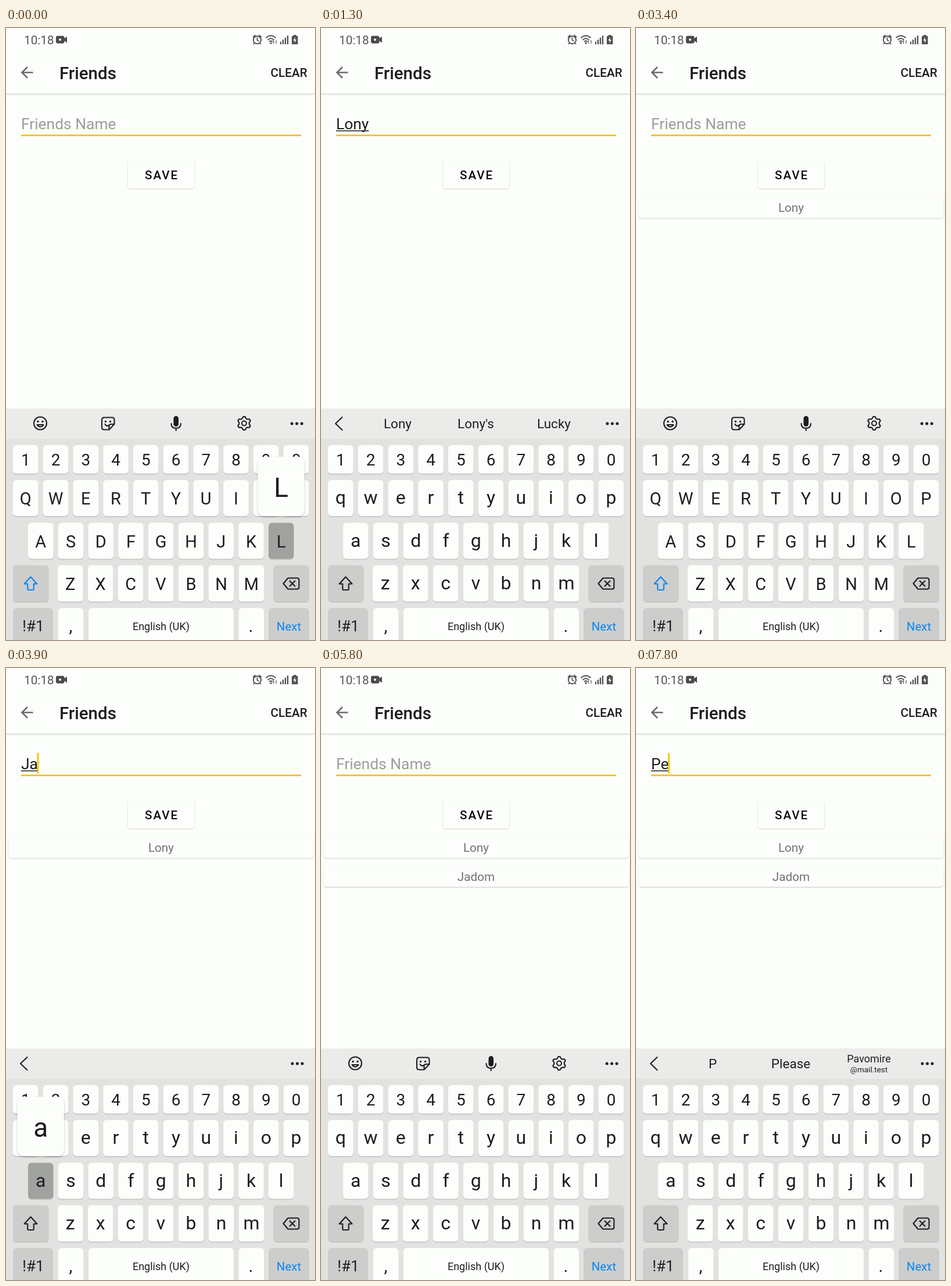
An HTML page for the animation above (8000 ms loop, 532 px wide and 1052 px high).

```html
<!DOCTYPE html>
<html lang="en">
<head>
<meta charset="utf-8">
<title>Friends</title>
<style>
  html, body { margin: 0; width: 100%; height: 100%; overflow: hidden; background: #fcfefb; }
  svg { display: block; width: 100%; height: 100%; }
  text { font-family: Roboto, sans-serif; fill: #1c1d1c; white-space: pre; }
  .mid { text-anchor: middle; }
  .bold { font-weight: 500; }
  .line { fill: none; stroke: #1c1d1c; stroke-width: 2.1; stroke-linecap: round; stroke-linejoin: round; }
  .status { fill: none; stroke: #505250; stroke-width: 1.8; }
</style>
</head>
<body>
<svg id="stage" viewBox="0 0 532 1052">
  <defs>
    <linearGradient id="fade" gradientUnits="userSpaceOnUse" x1="440" x2="472" y1="0" y2="0">
      <stop stop-color="#1c1d1c"/><stop offset="1" stop-color="#1c1d1c" stop-opacity="0"/>
    </linearGradient>
    <linearGradient id="edge" x2="0" y2="1">
      <stop stop-color="#d9dbd8"/><stop offset="1" stop-color="#fcfefb"/>
    </linearGradient>
    <filter id="lift" x="-20%" y="-20%" width="140%" height="140%">
      <feDropShadow dx="0" dy="1.5" stdDeviation="1.8" flood-opacity=".28"/>
    </filter>
    <filter id="soft" x="-5%" y="-20%" width="110%" height="150%">
      <feDropShadow dx="0" dy="1" stdDeviation="1" flood-opacity=".22"/>
    </filter>
  </defs>
  <rect width="532" height="1052" fill="#fcfefb"/>

  <g id="statusBar">
    <text x="31" y="27.7" font-size="20.7" style="fill:#555755">10:18</text>
    <rect x="86" y="13.5" width="14.5" height="13" rx="3" fill="#4a4c4a"/>
    <path d="M99 19L105 14.5V25.5L99 21Z" fill="#4a4c4a"/>
    <circle cx="93" cy="20" r="2" fill="#fcfefb"/>
    <g class="status">
      <circle cx="432.5" cy="20.5" r="6.6" stroke-width="2"/>
      <path d="M432.5 16.5V21L435.5 22.5M425 16L429.5 12M440 16L435.5 12M428 25.5L426 28M437 25.5L439 28"/>
      <path d="M447.5 17Q456 9.500 464.500 17M450.500 20.500Q456 15.500 461.500 20.500M453 23.500Q456 21 459 23.500"/>
      <path d="M460.500 21V27M465 27V21" stroke-width="1.2"/>
      <path d="M473 28V23.500M477 28V20M481 28V16.500M485 28V13" stroke-width="2.300"/>
    </g>
    <circle cx="456" cy="26" r="1.700" fill="#505250"/>
    <path d="M494.500 12H500V14H502.500V28H492V14H494.500Z" fill="#505250"/>
    <path d="M498 15.500L494.500 21.500H497L496.500 26L500 20H497.500Z" fill="#fcfefb"/>
  </g>

  <path d="M46.500 76.500H28M37 67L27.500 76.500L37 86" class="line" style="stroke:#6a6c6a;stroke-width:2.600;stroke-linecap:butt;stroke-linejoin:miter"/>
  <text x="92" y="87.500" font-size="29.500" class="bold">Friends</text>
  <text x="455.500" y="84" font-size="20.700" class="bold">CLEAR</text>
  <rect y="112.500" width="532" height="4" fill="url(#edge)"/>

  <text id="entry" x="26" y="173.500" font-size="26.400"></text>
  <rect id="under" x="26" y="176" height="1.500" fill="#1c1d1c"/>
  <rect x="26" y="183.200" width="482" height="2.800" fill="#f7c40e"/>
  <rect id="caret" y="146" width="3" height="35.500" fill="#f7c40e"/>

  <rect id="save" x="210" y="228" width="114" height="47.500" rx="4" filter="url(#soft)"/>
  <text x="268" y="259.500" font-size="20.700" class="mid bold" letter-spacing="1.800" style="fill:#0c0d0c">SAVE</text>
  <g id="cards"></g>

  <rect y="654" width="532" height="52" fill="#ebecea"/>
  <g id="tools" class="line">
    <circle cx="59" cy="679.500" r="11"/>
    <path d="M53.500 682Q59 689 64.500 682Z"/>
    <path d="M169 669.500H182.500Q186.500 669.500 186.500 673.500V681L177.500 690.500H169Q165 690.500 165 686.500V673.500Q165 669.500 169 669.500ZM186 681H181Q177.500 681 177.500 685V690M170.500 681Q173 685.500 177 683"/>
    <path d="M284.500 680Q284.500 688 292.700 688T301 680M292.700 688V692"/>
    <rect x="289.500" y="668" width="6.500" height="16" rx="3.200" fill="#1c1d1c"/>
    <path id="gear"/>
    <circle cx="410" cy="679.500" r="4"/>
    <g fill="#1c1d1c" stroke="none">
      <circle cx="55" cy="676.500" r="1.800"/><circle cx="63" cy="676.500" r="1.800"/>
      <circle cx="171.500" cy="676.500" r="1.700"/><circle cx="179.500" cy="676.500" r="1.700"/>
    </g>
  </g>
  <path id="back" d="M36.500 669L25 680L36.500 691" class="line"/>
  <g id="dots" fill="#1c1d1c"><circle cx="492.500" cy="680" r="2.500"/><circle cx="501" cy="680" r="2.500"/><circle cx="509.500" cy="680" r="2.500"/></g>
  <g id="hints"></g>

  <rect y="706" width="532" height="346" fill="#e2e3e1"/>
  <g id="keys"></g>
  <path id="arrow" class="line" d="M42.500 943.500L53.500 955.500H47.800V964Q47.800 966 45.800 966H39.200Q37.200 966 37.200 964V955.500H31.500Z"/>
  <path class="line" d="M485.500 945.500H501Q504.500 945.500 504.500 949V961Q504.500 964.500 501 964.500H485.500L477.500 955ZM488.500 950.500L497.500 959.500M497.500 950.500L488.500 959.500"/>
  <g id="popup">
    <rect width="80" height="102" rx="11" fill="#fcfefb" filter="url(#lift)"/>
    <text x="40" y="69" font-size="46" class="mid"></text>
  </g>
</svg>
<script>
const LOOP = 8000, STEP = 100;
const PAPER = '#fcfefb', GREY = '#cdcecc', PRESSED = '#a0a29f', INK = '#1c1d1c', BLUE = '#0b84f3';
const $ = id => document.getElementById(id);

function add(parent, tag, attrs, content = '') {
  const el = document.createElementNS('http://www.w3.org/2000/svg', tag);
  for (const name in attrs) el.setAttribute(name, attrs[name]);
  el.textContent = content;
  return parent.appendChild(el);
}
const label = (parent, x, y, size, str) =>
  add(parent, 'text', { x, y, 'font-size': size, class: 'mid' }, str);
const show = (el, on) => el.setAttribute('visibility', on ? 'visible' : 'hidden');

// Keyboard
const keys = {};
function cap(x, y, w, h, fill = PAPER) {
  add($('keys'), 'rect', { x, y: y + 1.8, width: w, height: h, rx: 6, fill: '#c5c6c4' });
  return add($('keys'), 'rect', { x, y, width: w, height: h, rx: 6, fill });
}
function row(chars, x, y, h, pitch) {
  [...chars].forEach((ch, i) => {
    const left = x + i * pitch;
    const rect = cap(left, y, 43.5, h);
    const text = label($('keys'), left + 21.75, y + 35.3, 28, ch);
    if (h > 50) keys[ch] = { rect, text, x: left + 21.75, y };
  });
}
row('1234567890', 12, 717, 49, 51.75);
row('qwertyuiop', 12, 777, 62, 51.75);
row('asdfghjkl', 38, 850.5, 62, 51.75);
row('zxcvbnm', 89, 923.5, 62.5, 51.95);
const shift = cap(12, 923.5, 61.5, 62.5, GREY);
cap(460, 923.5, 62, 62.5, GREY);
cap(12, 997, 69, 70, GREY);
cap(90, 997, 43.5, 70);
cap(142, 997, 250, 70);
cap(400.5, 997, 43.5, 70);
cap(452, 997, 70, 70, GREY);
label($('keys'), 47, 1037, 26, '!#1');
label($('keys'), 111.5, 1038, 30, ',');
label($('keys'), 267, 1035, 18, 'English (UK)');
label($('keys'), 421.5, 1038, 30, '.');
label($('keys'), 487, 1036, 20.5, 'Next').style.fill = BLUE;

// Gear outline: six rounded teeth
const gear = [];
for (let i = 0; i < 24; i++) {
  const a = (i - 0.5) * Math.PI / 12, r = i % 4 < 2 ? 11.6 : 8.8;
  gear.push((410 + r * Math.sin(a)).toFixed(1) + ' ' + (679.5 - r * Math.cos(a)).toFixed(1));
}
$('gear').setAttribute('d', 'M' + gear.join('L') + 'Z');

// Saved names
const cards = [['Lony', 1700, 289], ['Jadom', 5300, 338.5]].map(([name, at, y]) => {
  const g = add($('cards'), 'g', {});
  add(g, 'rect', { x: 4.5, y, width: 525, height: 37.5, rx: 5, fill: PAPER, filter: 'url(#soft)' });
  label(g, 267, y + 27, 20.7, name).style.fill = '#707270';
  return { g, at };
});

// Word suggestions: start, end, words
const hints = [
  [1000, 1700, 'Lony', "Lony's", 'Lucky'],
  [4600, 5300, 'Jadom', "Jadom's", 'Jadomtown'],
  [7300, LOOP, 'P', 'Please', 'Pavomire\n@mail.test']
].map(([from, to, ...words]) => {
  const g = add($('hints'), 'g', {});
  words.forEach((word, i) => {
    const x = 132 + i * 134.5, [first, second] = word.split('\n');
    const el = label(g, x, second ? 678 : 688, second ? 18 : 22.5, first);
    if (i === 2) el.style.fill = 'url(#fade)';
    if (second) label(g, x, 695, 13.5, second);
  });
  return { g, from, to };
});

// Timeline
const entries = [
  [-500, ''], [100, 'L'], [300, 'Lo'], [600, 'Lon'], [800, 'Lony'], [1700, ''],
  [3800, 'J'], [3900, 'Ja'], [4000, 'Jad'], [4200, 'Jado'], [4400, 'Jadom'], [5300, ''],
  [7100, 'P'], [7600, 'Pe']
];
const presses = [
  [0, 200, 'L'], [300, 500, 'o'], [600, 700, 'n'], [800, 900, 'y'],
  [3700, 3900, 'J'], [3900, 4000, 'a'], [4000, 4100, 'd'], [4200, 4300, 'o'], [4400, 4500, 'm'],
  [7000, 7200, 'P'], [7600, 7800, 'e']
];
const capsSpans = [[0, 100], [3400, 3800], [6200, 7100]];
const within = (t, from, to) => t >= from && t < to;

function drawEntry(t) {
  const [since, str] = entries.filter(e => e[0] <= t).pop();
  const entry = $('entry');
  entry.textContent = str || 'Friends Name';
  entry.style.fill = str ? INK : '#9b9d9a';
  const width = str ? entry.getComputedTextLength() : 0;
  $('under').setAttribute('width', width);
  $('caret').setAttribute('x', Math.max(27, 24.5 + width));
  show($('caret'), (t - since) % 1000 < 500);
  return str;
}

function drawKeys(t) {
  const caps = capsSpans.some(([a, b]) => within(t, a, b));
  const press = presses.find(([a, b]) => within(t, a, b));
  const down = press && press[2].toLowerCase();
  for (const ch in keys) {
    const { rect, text, y } = keys[ch];
    text.textContent = caps ? ch.toUpperCase() : ch;
    text.setAttribute('font-size', caps ? 29 : 32);
    text.setAttribute('y', y + (caps ? 42.3 : 41));
    rect.setAttribute('fill', ch === down ? PRESSED : PAPER);
  }
  $('arrow').style.stroke = caps ? BLUE : INK;
  shift.setAttribute('fill', within(t, 6100, 6200) ? PRESSED : GREY);
  show($('popup'), press);
  if (press) {
    const { x, y } = keys[down];
    $('popup').setAttribute('transform', `translate(${Math.min(442, x - 40)} ${y - 113.5})`);
    $('popup').lastElementChild.textContent = press[2];
  }
}

function draw(t) {
  const typing = drawEntry(t) !== '';
  drawKeys(t);
  show($('tools'), !typing);
  show($('back'), typing);
  $('dots').setAttribute('transform', `translate(${typing ? 0.5 : -0.3} 0)`);
  for (const { g, from, to } of hints) {
    show(g, within(t, from, to));
    g.setAttribute('opacity', Math.min(1, (t - from + STEP) / (2 * STEP)));
  }
  for (const { g, at } of cards) show(g, t >= at);
  const tap = [1600, 5200].find(a => within(t, a, a + 400));
  const tone = tap === undefined ? 0 : 1 - (t - tap) / 400;
  $('save').setAttribute('fill', `rgb(${252 - 20 * tone},${254 - 20 * tone},${251 - 20 * tone})`);
}

const start = performance.now();
function tick() {
  const t = (performance.now() - start) % LOOP;
  draw(Math.floor(t / STEP) * STEP);
  requestAnimationFrame(tick);
}
tick();
</script>
</body>
</html>
```
